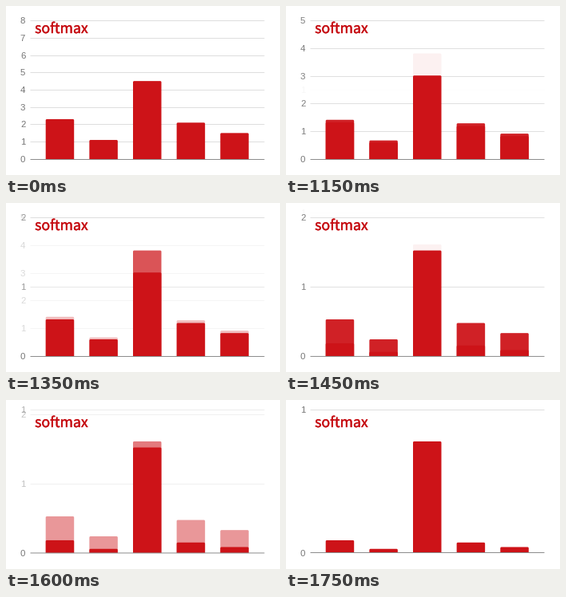
A matplotlib script that plays this animation: 343 px wide and 212 px high, repeating every 2750 ms.

```python
import numpy as np
import matplotlib.pyplot as plt
import matplotlib.patheffects as pe
from matplotlib.animation import FuncAnimation
from matplotlib.patches import PathPatch
from matplotlib.path import Path

W, H, DPI = 343, 212, 100
PX = 72 / DPI
STEP, FRAMES = 50, 55
LEFT, RIGHT, FLOOR = 30, 322.5, 192
BAR_X, BAR_GAP, BAR_W = 49.7, 54.65, 35.5
RED, TITLE, GREY = "#cd1318", "#c60b11", "#757575"
GRID, AXIS = "#dedede", "#8c8c8c"

scores = np.array([2.3, 1.1, 4.5, 2.1, 1.5])
probs = np.exp(scores) / np.exp(scores).sum()

# (axis maximum, y of top line, y of zero line, progress from scores to probs)
STAGES = [(8, 18.05, 191.95, 0.0), (5, 18.05, 191.95, 0.4),
          (2, 18.05, 191.95, 0.8), (1, 12.2, 191.4, 1.0)]

fig = plt.figure(figsize=(W / DPI, H / DPI), dpi=DPI, facecolor="white")
ax = fig.add_axes([0, 0, 1, 1])


def fade_at(n):
    """Return the current stage and how far the next one has faded in."""
    if n < 20:
        return 0, 0.0
    if n < 23:
        return 0, 0.27 + 0.25 * (n - 20)
    u = min(1.06 + (n - 23) / 6, 3)
    return int(u), u % 1


def y_of(stage, value):
    most, top, base, _ = STAGES[stage]
    return base - value * (base - top) / most


def bar_tops(stage):
    s = STAGES[stage][3]
    return y_of(stage, scores + s * (probs - scores))


def bar(x, top, alpha, z):
    r, x1 = 1.5, x + BAR_W
    pts = [(x, FLOOR), (x, top + r), (x, top), (x + r, top),
           (x1 - r, top), (x1, top), (x1, top + r), (x1, FLOOR), (x, FLOOR)]
    codes = [Path.MOVETO, Path.LINETO, Path.CURVE3, Path.CURVE3,
             Path.LINETO, Path.CURVE3, Path.CURVE3, Path.LINETO,
             Path.CLOSEPOLY]
    ax.add_patch(PathPatch(Path(pts, codes), fc=RED, lw=0,
                           alpha=alpha, zorder=z))


def hline(y, color, alpha, z):
    ax.plot([LEFT, RIGHT], [y, y], color=color, lw=PX, alpha=alpha,
            zorder=z, solid_capstyle="butt", snap=True)


def label(value, y, alpha=1):
    ax.text(24.3, y, str(value), color=GREY, alpha=alpha, ha="right",
            va="center_baseline", family="Liberation Sans",
            fontsize=11.4 * PX)


def draw(n):
    ax.clear()
    ax.set_xlim(0, W)
    ax.set_ylim(H, 0)
    ax.axis("off")

    stage, mix = fade_at(n)
    after = min(stage + 1, len(STAGES) - 1)
    lines = {}
    for s, weight in ((stage, 1 - mix), (after, mix)):
        if weight <= 0:
            continue
        for v in range(STAGES[s][0] + 1):
            key = (y_of(s, v), v == 0)
            lines[key] = lines.get(key, 0) + weight
            if v:
                label(v, key[0], weight)
    for (y, is_axis), weight in lines.items():
        hline(y, AXIS if is_axis else GRID, min(weight, 1),
              4 if is_axis else 1)

    for i, (a, b) in enumerate(zip(bar_tops(stage), bar_tops(after))):
        x = BAR_X + i * BAR_GAP
        if mix > 0:
            bar(x, min(a, b), mix if b < a else 1 - mix, 2)
            bar(x, max(a, b), 1, 3)
        else:
            bar(x, a, 1, 3)

    label(0, 191.7)
    ax.text(36.1, 34, "softmax", color=TITLE, va="baseline",
            family=["Noto Sans CJK JP", "DejaVu Sans"],
            fontsize=17.7 * PX, zorder=5,
            path_effects=[pe.withStroke(linewidth=0.4 * PX,
                                        foreground=TITLE)])
    return []


anim = FuncAnimation(fig, draw, frames=FRAMES, interval=STEP,
                     init_func=lambda: draw(0), repeat=True, repeat_delay=0)
plt.show()
```
